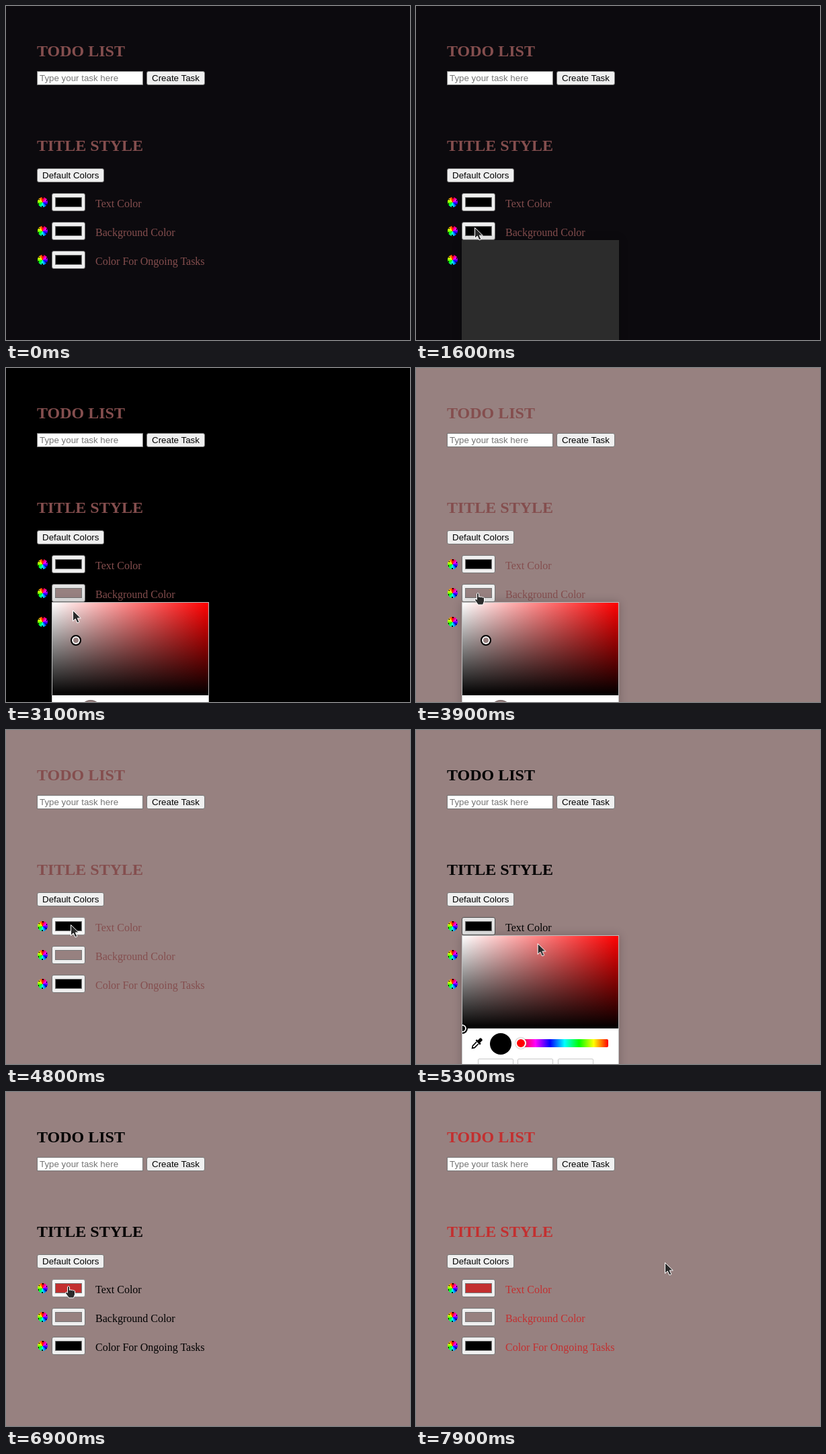
An HTML page that plays this animation: 601x498 px, repeating every 8000 ms.

```html
<!DOCTYPE html>
<html lang="en">
<head>
<meta charset="utf-8">
<title>Todo list</title>
<style>
  html, body { margin: 0; width: 100%; height: 100%; overflow: hidden; }
  .stage {
    position: relative; width: 100%; height: 100%; overflow: hidden; contain: strict;
    background: var(--bg); animation: page 8s step-end infinite;
  }
  .stage div, .stage svg, .stage span { position: absolute; box-sizing: border-box; }
  .serif { left: 133px; font: 16px/18px "Liberation Serif", serif; color: var(--ink); white-space: nowrap; }
  .title { left: 46px; font-size: 24px; line-height: 27px; font-weight: bold; }
  .control {
    height: 21px; border: 1px solid #767676; border-radius: 3px; background: #efefef; color: #000;
    font: 13.3333px/15px "Liberation Sans", sans-serif; padding: 2px 7px; white-space: nowrap;
  }
  .input { background: #fff; color: #757575; padding: 2px 3px; border-radius: 0; }
  .swatch { left: 68px; width: 50px; height: 27px; border: 1px solid #767676; border-radius: 3px; }
  .chip { left: 4px; top: 5px; width: 40px; height: 15px; border: 1px solid #777; }

  .wheel {
    left: 46.500px; width: 15px; height: 15px; border-radius: 50%;
    background: conic-gradient(#f00, #f0f, #00f, #0ff, #0f0, #ff0, #f00);
  }
  .wheel::after {
    content: ""; position: absolute; inset: 0; border-radius: 50%;
    background: repeating-conic-gradient(#000 0 12deg, transparent 0 60deg);
    mask: radial-gradient(circle, transparent 5.5px, #000 6px);
  }

  .picker {
    left: 68px; width: 234px; height: 260px; overflow: hidden;
    background: #2c2c2c; box-shadow: 0 0 13px rgba(0, 0, 0, .22);
    animation: picker 8s step-end infinite;
  }
  .panel { inset: 0; border: 1px solid #bfbfbf; background: #fff; opacity: var(--ready); overflow: hidden; }
  .field {
    width: 232px; height: 138px;
    background: linear-gradient(transparent, #000), linear-gradient(90deg, #fff, #f00);
  }
  .handle, .hue-handle { width: 16px; height: 16px; border-radius: 50%; border: 2px solid #000; }
  .handle {
    left: calc(var(--x) - 8px); top: calc(var(--y) - 8px);
    background: var(--pick); box-shadow: inset 0 0 0 2px #fff;
  }
  .hue {
    left: 87px; top: 154px; width: 130px; height: 12px; border-radius: 2px;
    background: linear-gradient(90deg, #f00, #f0f, #00f, #0ff, #0f0, #ff0, #f00);
  }
  .hue-handle { left: 79px; top: 152px; background: #f00; border-color: #fff; box-shadow: 0 0 2px #777; }
  .preview {
    left: 41px; top: 145px; width: 32px; height: 32px;
    border-radius: 50%; background: var(--pick); border: 1px solid rgba(0, 0, 0, .3);
  }
  .value { top: 183px; width: 53px; height: 22px; border: 1px solid #c8c8c8; border-radius: 2px; }

  .cursor { left: 0; top: 0; overflow: visible; animation: move 8s infinite; }
  .cursor path { fill: #2b2b2b; stroke: #fff; }
  .arrow { animation: arrow 8s step-end infinite; }
  .hand { animation: hand 8s step-end infinite; }

  @keyframes page {
    0% { --bg: #0c0a0e; --ink: #844e4e; --a: #000; --b: #000; --fa: #efefef; --fb: #efefef; --edge: #767676; }
    21.25% { --bg: #000; --ink: #844e4e; --a: #000; --b: #000; --fa: #e3e3e3; --fb: #efefef; --edge: #767676; }
    33.75% { --bg: #000; --ink: #844e4e; --a: #978180; --b: #000; --fa: #e3e3e3; --fb: #efefef; --edge: #767676; }
    45% { --bg: #000; --ink: #844e4e; --a: #978180; --b: #000; --fa: #efefef; --fb: #efefef; --edge: #767676; }
    47.5% { --bg: #978180; --ink: #844e4e; --a: #978180; --b: #000; --fa: #efefef; --fb: #efefef; --edge: #767676; }
    60% { --bg: #978180; --ink: #844e4e; --a: #978180; --b: #000; --fa: #efefef; --fb: #f5f5f5; --edge: #8d8d8d; }
    62.5% { --bg: #978180; --ink: #000; --a: #978180; --b: #000; --fa: #efefef; --fb: #e5e5e5; --edge: #4f4f4f; }
    71.25% { --bg: #978180; --ink: #000; --a: #978180; --b: #c32f2f; --fa: #efefef; --fb: #e5e5e5; --edge: #4f4f4f; }
    82.5% { --bg: #978180; --ink: #000; --a: #978180; --b: #c32f2f; --fa: #efefef; --fb: #f5f5f5; --edge: #8d8d8d; }
    88.75%, 100% { --bg: #978180; --ink: #c32f2f; --a: #978180; --b: #c32f2f; --fa: #efefef; --fb: #efefef; --edge: #767676; }
  }
  @keyframes picker {
    0% { opacity: 0; top: 349px; --ready: 0; --x: 0px; --y: 138px; --pick: #000; }
    20% { opacity: 1; top: 349px; --ready: 0; --x: 0px; --y: 138px; --pick: #000; }
    21.25% { opacity: 1; top: 349px; --ready: 1; --x: 0px; --y: 138px; --pick: #000; }
    33.75% { opacity: 1; top: 349px; --ready: 1; --x: 35px; --y: 56px; --pick: #978180; }
    45% { opacity: 0; top: 349px; --ready: 0; --x: 35px; --y: 56px; --pick: #978180; }
    47.5% { opacity: 1; top: 349px; --ready: 0; --x: 35px; --y: 56px; --pick: #978180; }
    48.75% { opacity: 1; top: 349px; --ready: 1; --x: 35px; --y: 56px; --pick: #978180; }
    57.5% { opacity: 0; top: 306px; --ready: 0; --x: 0px; --y: 138px; --pick: #000; }
    61.25% { opacity: 1; top: 306px; --ready: 0; --x: 0px; --y: 138px; --pick: #000; }
    62.5% { opacity: 1; top: 306px; --ready: 1; --x: 0px; --y: 138px; --pick: #000; }
    71.25% { opacity: 1; top: 306px; --ready: 1; --x: 175px; --y: 32px; --pick: #c32f2f; }
    82.5% { opacity: 0; top: 306px; --ready: 0; --x: 175px; --y: 32px; --pick: #c32f2f; }
    87.5% { opacity: 1; top: 306px; --ready: 0; --x: 175px; --y: 32px; --pick: #c32f2f; }
    88.75% { opacity: 1; top: 306px; --ready: 1; --x: 175px; --y: 32px; --pick: #c32f2f; }
    96.25%, 100% { opacity: 0; top: 306px; --ready: 0; --x: 175px; --y: 32px; --pick: #c32f2f; }
  }
  /* Pointer positions advance ten times a second */
  @keyframes move {
    0% { transform: translate(157px, 463px); }
    6.25% { transform: translate(157px, 463px); animation-timing-function: steps(7); }
    15% { transform: translate(90px, 313px); animation-timing-function: steps(1); }
    16.25% { transform: translate(87px, 330px); }
    20% { transform: translate(87px, 330px); animation-timing-function: steps(4); }
    25% { transform: translate(150px, 462px); }
    26.25% { transform: translate(150px, 462px); animation-timing-function: steps(4); }
    31.25% { transform: translate(104px, 406px); }
    35% { transform: translate(104px, 406px); animation-timing-function: steps(3); }
    38.75% { transform: translate(99px, 361px); animation-timing-function: steps(3); }
    42.5% { transform: translate(91px, 335px); }
    51.25% { transform: translate(91px, 335px); animation-timing-function: steps(4); }
    56.25% { transform: translate(96px, 290px); }
    61.25% { transform: translate(96px, 290px); animation-timing-function: steps(7); }
    70% { transform: translate(244px, 339px); }
    75% { transform: translate(244px, 339px); animation-timing-function: steps(1); }
    76.25% { transform: translate(204px, 317px); animation-timing-function: steps(3); }
    80% { transform: translate(92px, 289px); }
    87.5% { transform: translate(92px, 289px); animation-timing-function: steps(6); }
    95% { transform: translate(469px, 300px); animation-timing-function: steps(3); }
    98.75%, 100% { transform: translate(370px, 254px); }
  }
  @keyframes arrow {
    0%, 45%, 82.5% { opacity: 0; }
    6.25%, 52.5%, 88.75%, 100% { opacity: 1; }
  }
  @keyframes hand {
    0%, 52.5%, 88.75%, 100% { opacity: 0; }
    45%, 82.5% { opacity: 1; }
  }
</style>
</head>
<body>
<div class="stage">
  <span class="serif title" style="top:54px">TODO LIST</span>
  <div class="control input" style="left:46px; top:97px; width:158px">Type your task here</div>
  <div class="control" style="left:209px; top:97px; width:87px">Create Task</div>
  <span class="serif title" style="top:195px">TITLE STYLE</span>
  <div class="control" style="left:46px; top:242px; width:100px">Default Colors</div>
  <section id="rows"></section>

  <div class="picker">
    <div class="panel">
      <div class="field"></div>
      <div class="handle"></div>
      <svg width="232" height="200">
        <g transform="translate(21 161) rotate(45)">
          <path d="M-2.5 -10q2.5 -2 5 0v5h2v2.5h-9v-2.5h2z"/>
          <path d="M-2 -2v8l2 3 2-3v-8" fill="none" stroke="#000" stroke-width="1.6"/>
        </g>
      </svg>
      <div class="preview"></div>
      <div class="hue"></div>
      <div class="hue-handle"></div>
      <div class="value" style="left:23px"></div>
      <div class="value" style="left:82px"></div>
      <div class="value" style="left:142px"></div>
    </div>
  </div>

  <svg class="cursor" width="20" height="24">
    <path class="arrow" d="M.5 .5v16l3.7-3.5 2.8 6 3-1.3-2.700-5.7h5z"/>
    <path class="hand" d="M-.5 1.5q1.5-2 3 0v5q1.5-1.5 2.5 0 1.5-1 2.5.5 2-1 3 1v5l-2 5h-7l-5-7q0-2 2-1.5l1 1z"/>
  </svg>
</div>

<script>
  const rows = [
    ["Text Color", "var(--b)", "var(--fb)", "var(--edge)"],
    ["Background Color", "var(--a)", "var(--fa)", "#767676"],
    ["Color For Ongoing Tasks", "#000", "#efefef", "#767676"]
  ];
  const rowMarkup = ([label, color, frame, edge], i) => {
    const y = 279 + 43 * i;
    return `<div class="wheel" style="top:${y + 5.5}px"></div>
      <div class="swatch" style="top:${y}px; background:${frame}; border-color:${edge}">
        <div class="chip" style="background:${color}"></div>
      </div>
      <span class="serif" style="top:${y + 7}px">${label}</span>`;
  };
  document.getElementById("rows").innerHTML = rows.map(rowMarkup).join("");
</script>
</body>
</html>
```
